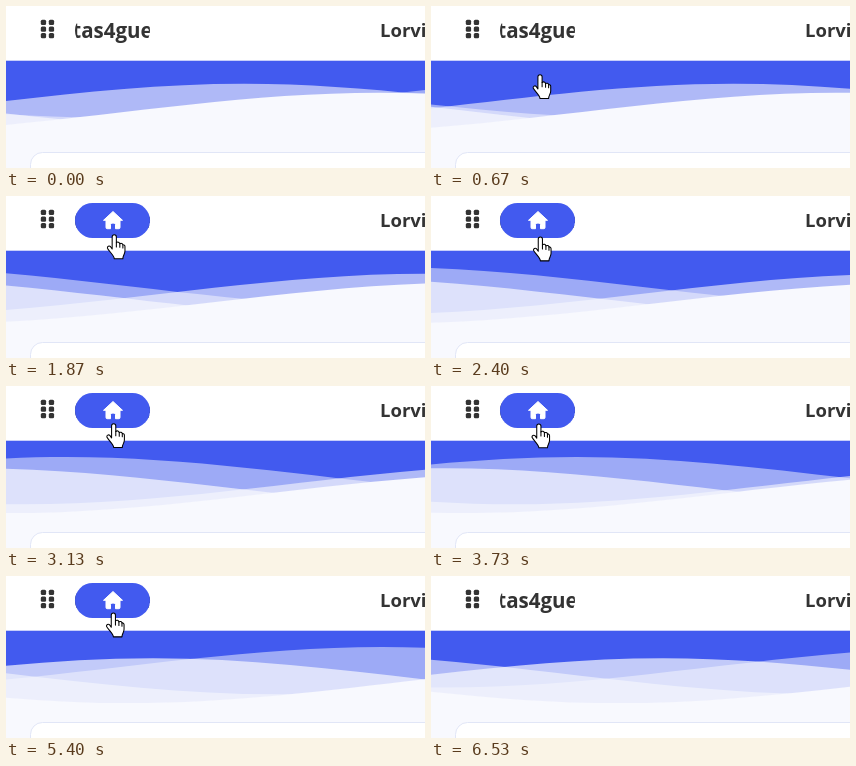
An HTML page for the animation above (6590 ms loop, 419 by 162 pixels).

```html
<!DOCTYPE html>
<html lang="en">
<head>
<meta charset="utf-8">
<title>Wave header</title>
<style>
  html, body { margin: 0; width: 100%; height: 100%; overflow: hidden; background: #f8f9fe; }
  svg { display: block; }
  text { font-family: "Open Sans", "Noto Sans", sans-serif; font-weight: 700; fill: #333; }
</style>
</head>
<body>
<svg width="419" height="162" viewBox="0 0 419 162">
  <defs>
    <clipPath id="slot"><rect x="69" y="7" width="75" height="35" rx="17.5"/></clipPath>
  </defs>
  <rect width="419" height="128" fill="#425aef"/>
  <g id="waves" fill="#f8f9fe"></g>
  <rect y="127" width="419" height="35" fill="#f8f9fe"/>
  <rect x="24.5" y="146.5" width="600" height="60" rx="12" fill="#fff" stroke="#e1e6f7"/>

  <rect width="419" height="54.7" fill="#fff"/>
  <g id="grip" fill="#333"></g>
  <g clip-path="url(#slot)">
    <text x="106.5" y="31.5" font-size="20.5" text-anchor="middle">tas4gue</text>
  </g>
  <text x="374" y="30.5" font-size="18.5">Lorvi</text>

  <g id="home">
    <rect x="69" y="7" width="75" height="35" rx="17.5" fill="#425aef"/>
    <path fill="#fff" stroke="#fff" stroke-linejoin="round"
      d="M107 15.5L97.5 24.3H100V31.5Q100 32.7 101.2 32.7H104.5V28.5Q104.5 27 107 27T109.5 28.5V32.7H112.8Q114 32.7 114 31.5V24.3H116.5Z"/>
  </g>

  <g id="hand" stroke="#000" stroke-linejoin="round" stroke-linecap="round">
    <path fill="#fff" d="M5 14V2.5a2 2 0 0 1 4 0V8a1.9 1.9 0 0 1 3.3 1a1.8 1.8 0 0 1 2.9 .9a1.7 1.7 0 0 1 2 1.7V16c0 3-2 4-2 7.2H7c0-3-5-7-6.5-10a1.7 1.7 0 0 1 2.8-1.6z"/>
    <path fill="none" d="M9 8v4M12.3 9v3.4M15.2 10v3"/>
  </g>
</svg>
<script>
const LOOP = 6.59;
const TRAVEL = 1050;
const $ = id => document.getElementById(id);
const clamp = v => Math.min(1, Math.max(0, v));

function add(parent, tag, attrs) {
  const el = document.createElementNS("http://www.w3.org/2000/svg", tag);
  for (const key in attrs) el.setAttribute(key, attrs[key]);
  return parent.appendChild(el);
}

// x: crest at the loop start, y: crest height, phase and period (s) of the drift
const layers = [
  { x: -436, y: 71,   phase: 0.35, period: 7,  alpha: 0.5 },
  { x: 238,  y: 77.8, phase: 0.95, period: 10, alpha: 0.6 },
  { x: -308, y: 82.2, phase: 0.43, period: 13, alpha: 0.7 },
  { x: 373,  y: 86.7, phase: 0.08, period: 20, alpha: 1 }
];
const ripple = "M-264 18" + "c30 0 58-18 88-18s58 18 88 18".repeat(3) + "V40H-264z";
for (const layer of layers)
  layer.el = add($("waves"), "path", { d: ripple, "fill-opacity": layer.alpha });

for (let i = 0; i < 6; i++)
  add($("grip"), "rect", {
    x: 34.8 + (i % 2) * 8, y: 13.8 + (i >> 1) * 6.6, width: 5.3, height: 5.3, rx: 1.5
  });

// Steady drift, a little slower at both ends of a period
const drift = p => TRAVEL * p - 15 * Math.sin(2 * Math.PI * p);

function pointer(t) {
  const bob = Math.cos(Math.PI * (t - 2.4));
  let y = 39 + 2 * bob;
  if (t < 1.25) y = 37 + 80 * (1 - clamp((t - 0.33) / 0.92)) ** 2;
  if (t > 5.5) y = 37.2 + 7 * ((t - 5.5) / 0.5) ** 3.5;
  return [101 + bob, y - 0.5];
}

function draw(t) {
  for (const { el, x, y, phase, period } of layers) {
    const crest = x + drift(phase + t / period) - drift(phase);
    el.setAttribute("transform", `translate(${crest} ${y}) scale(6 2.25)`);
  }
  $("home").setAttribute("opacity", clamp((t - 0.97) / 0.35) * clamp((5.95 - t) / 0.35));
  $("hand").setAttribute("transform", `translate(${pointer(t)}) scale(1.05)`);
  $("hand").setAttribute("visibility", t > 0.33 && t < 6.5 ? "visible" : "hidden");
}

const start = performance.now();
function tick() {
  draw((performance.now() - start) / 1000 % LOOP);
  requestAnimationFrame(tick);
}
tick();
</script>
</body>
</html>
```
